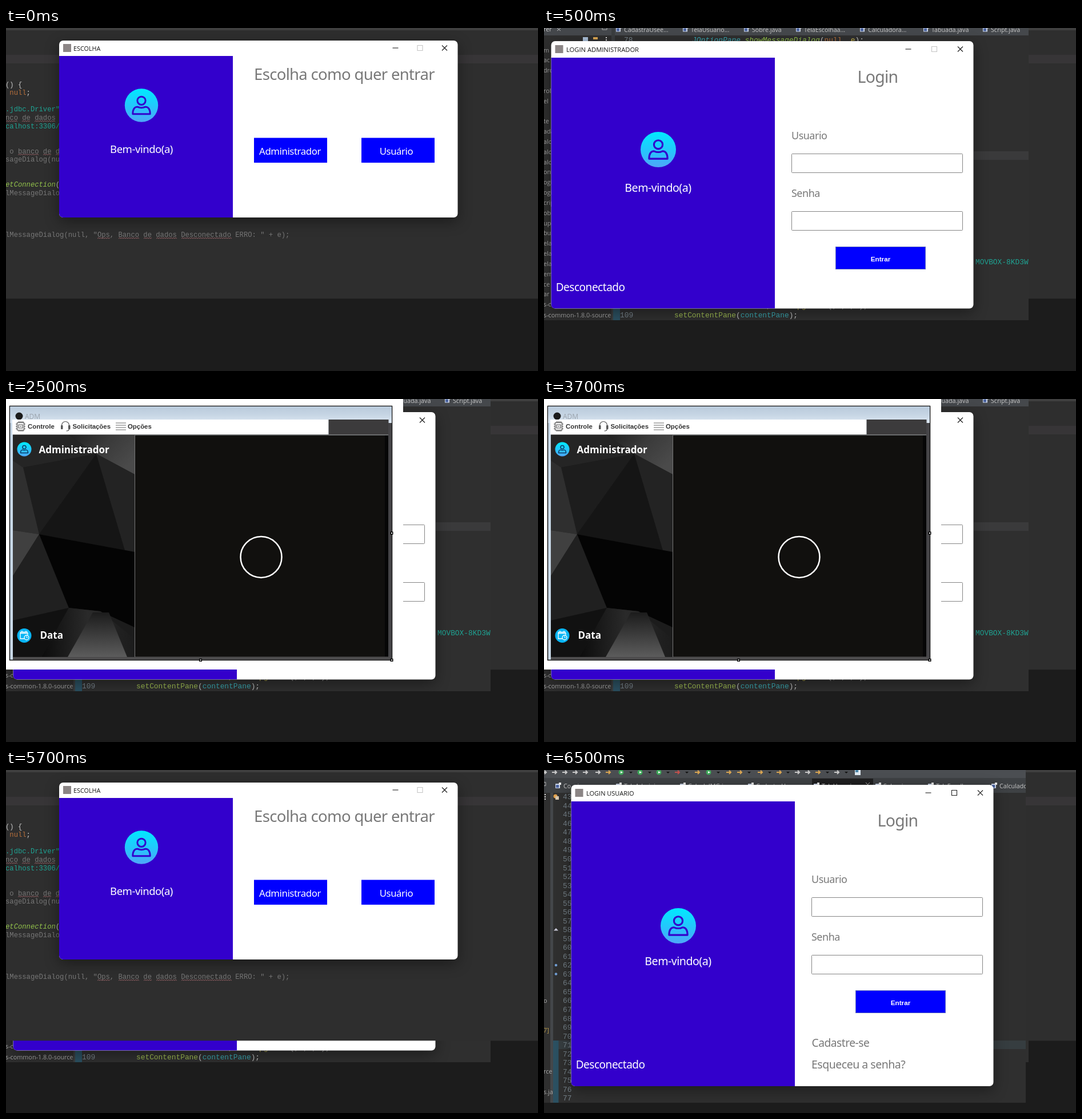
An HTML page that plays this animation: 931x601 px, repeating every 8 s.

```html
<!DOCTYPE html>
<html lang="pt">
<head>
<meta charset="utf-8">
<title>Login</title>
<style>
  html, body { margin: 0; width: 100%; height: 100%; overflow: hidden; background: #1c1c1c; }
  svg { display: block; width: 931px; height: 601px; }
  text { white-space: pre; }
  .form { font-family: "Noto Sans", "Open Sans", sans-serif; letter-spacing: -.025em; }
  .ui { font-family: "Open Sans", "Noto Sans", sans-serif; }
  .bold { font-family: "Liberation Sans", Arial, sans-serif; font-weight: bold; }
  .head { font-family: "Noto Sans", "Open Sans", sans-serif; font-weight: bold; }
  .code { font-family: "Liberation Mono", "Courier New", monospace; }
  .shadow { filter: drop-shadow(0 7px 12px rgba(0, 0, 0, .4)); }
</style>
</head>
<body>
<svg id="stage" viewBox="0 0 931 601" xmlns="http://www.w3.org/2000/svg"></svg>
<script>
const LOOP = 8000;
const INDIGO = '#3300cc', GRAY = '#787878', TEAL = '#1fa393', DIM = '#777', LIGHT = '#c4c4c4';

const rect = (x, y, w, h, fill, more = '') =>
  `<rect x="${x}" y="${y}" width="${w}" height="${h}" fill="${fill}" ${more}/>`;
const path = (d, stroke, width = 1, fill = 'none') =>
  `<path d="${d}" fill="${fill}" stroke="${stroke}" stroke-width="${width}"/>`;
const circle = (x, y, r, fill, more = '') => `<circle cx="${x}" cy="${y}" r="${r}" fill="${fill}" ${more}/>`;
const poly = (points, fill) => `<polygon points="${points}" fill="${fill}"/>`;
const text = (kind, x, y, size, fill, str, anchor = 'start') =>
  `<text class="${kind}" x="${x}" y="${y}" font-size="${size}" fill="${fill}" text-anchor="${anchor}">${str}</text>`;

// parts: [string, colour, italic?]
const code = (x, y, size, ...parts) => text('code', x, y, size, LIGHT, parts.map(([s, c, it]) =>
  `<tspan fill="${c}"${it ? ' font-style="italic"' : ''}>${s}</tspan>`).join(''));

const wave = (x, y, w) => {
  let d = `M${x} ${y}`;
  for (let i = 2; i <= w; i += 2) d += `L${x + i} ${y + (i % 4 ? -1.6 : 0)}`;
  return path(d, '#9a6468', .9);
};

const avatar = (x, y, r, ink = INDIGO, width = .1) =>
  circle(x, y, r, 'url(#sky)') +
  `<g transform="translate(${x} ${y}) scale(${r})" fill="none" stroke="${ink}" stroke-width="${width}">
    <circle cy="-.28" r=".245"/>
    <path d="M-.52 .52Q-.52 .1-.24 .09Q0 .2 .24 .09Q.52 .1 .52 .52Z" stroke-linejoin="round"/></g>`;

function frame(x, y, w, h, bar, split, title, size, resizable) {
  const right = x + w, mid = y + bar / 2 - .5;
  const cx = right - 23, gap = bar < 28 ? 43 : 45.5;
  const id = 'win' + Math.round(x);
  return rect(x, y, w, h, '#fff', 'rx="7" class="shadow"') +
    `<clipPath id="${id}">${rect(x, y, w, h, '#fff', 'rx="7"')}</clipPath>` +
    `<g clip-path="url(#${id})">${rect(x, y + bar, split - x, h - bar, INDIGO)}</g>` +
    rect(x + 7, mid - 7, 14, 14, '#8b8585') +
    text('ui', x + (bar < 28 ? 25 : 26.5), mid + 4.6, size, '#161616', title) +
    path(`M${cx - 2 * gap - 5} ${mid}h10`, '#222', 1.1) +
    path(`M${cx - gap - 4.5} ${mid - 4.5}h9v9h-9z`, resizable ? '#222' : '#c4c4c4', 1.1) +
    path(`M${cx - 4.5} ${mid - 4.5}l9 9m0-9l-9 9`, '#222', 1.2);
}

const field = (x, y) => rect(x + .5, y + .5, 299, 33, '#fff', 'stroke="#858585" rx="1"');

function loginForm(dx, dy) {
  return `<g transform="translate(${dx} ${dy})">` +
    text('form', 584, 96, 28.4, GRAY, 'Login', 'middle') +
    text('form', 433, 195, 17.9, GRAY, 'Usuario') + field(433, 220) +
    text('form', 433, 296, 17.9, GRAY, 'Senha') + field(433, 321) +
    rect(510.5, 383.5, 157, 39, '#0000ff', 'stroke="#5a66c0"') +
    text('bold', 589, 409, 11.7, '#fff', 'Entrar', 'middle') + '</g>';
}

const tab = (x, y, str) => rect(x - 14, y - 8, 8, 8, '#c9d3e6') + rect(x - 13, y - 6, 5, 5, '#4a63a0') +
  rect(x - 8, y - 10, 4, 4, '#e6e6e6') + text('ui', x, y, 10.7, '#c8c8c8', str);

function choice() {
  const row = (y, ...parts) => code(-1, y, 12.2, ...parts);
  const line = (y, str, color = DIM) => row(y, [str, color]);
  const button = (x, label) => rect(x, 192.5, 128, 43.5, '#0000ff') +
    text('form', x + (label.length > 8 ? 63 : 61), 221.5, 16.8, '#fff', label, 'middle');
  return rect(0, 0, 931, 474.5, '#2e2e2e') + rect(0, 0, 931, 4, '#404040') + rect(0, 47, 931, 15, '#373537') +
    row(103, ['() {', LIGHT]) +
    row(117, [' null', '#b8703c'], [';', LIGHT]) +
    line(146, '.jdbc.Driver"', TEAL) +
    line(161, 'nco de dados') + wave(0, 164, 20) + wave(28, 164, 14) + wave(50, 164, 37) +
    line(175.5, 'calhost:3306/', TEAL) +
    line(219.5, ' o banco de d') + wave(21, 222.5, 37) + wave(65, 222.5, 14) + wave(87, 222.5, 6) +
    line(234, 'sageDialog(nu') +
    row(278, ['etConnection', '#93c34b', 1], ['(', LIGHT]) +
    line(293, 'lMessageDialo') +
    line(366, 'lMessageDialog(null, "Ops, Banco de dados Desconectado ERRO: " + e);') +
    wave(160, 369, 22) + wave(197, 369, 36) + wave(241, 369, 14) + wave(263, 369, 36) + wave(307, 369, 88) +
    frame(93, 22, 697.5, 310, 27, 397, 'ESCOLHA', 10.8) +
    avatar(237, 135.5, 29.2) +
    text('form', 237, 218.5, 18.5, '#fff', 'Bem-vindo(a)', 'middle') +
    text('form', 592, 90.5, 27.5, GRAY, 'Escolha como quer entrar', 'middle') +
    button(434, 'Administrador') + button(622, 'Usuário');
}

function adminLogin() {
  const tree = 'm ac dro  rol el  te ada alc alc alc ont ogi ogi crip obr upo bur ela ela ela em ce ar s-c'.split(' ');
  const tabs = [[140, 'CadastraUsee...'], [257, 'TelaUsuario...'], [364, 'Sobre.java'], [455, 'TelaEscolhaa...'],
    [567, 'Calculadora...'], [678, 'Tabuada.java'], [782, 'Script.java']];
  return rect(0, 0, 848, 512, '#2f2f2f') + rect(0, 0, 848, 13, '#45484c') + rect(118, 0, 6, 512, '#3a3d3f') +
    rect(752, 216, 96, 15, '#3a3a3b') + rect(121, 488, 12, 24, '#2b5061') +
    text('ui', -1, 6, 10.7, '#c8c8c8', 'rer') + path('M23 0l6 5m0-5l-6 5', '#bbb') + path('M102 0v3h8v-3', '#aaa') +
    tabs.map(([x, s]) => tab(x, 6.5, s)).join('') +
    rect(68, 16, 9, 7, '#a9bfd8') + rect(86, 16, 8, 4, '#d9a552') + rect(108, 16, 2, 2, '#ddd') + rect(108, 20, 2, 2, '#ddd') +
    code(140, 25, 12.87, ['78', '#76828a']) +
    code(259, 25, 12.87, ['JOptionPane', '#39a7b0', 1], ['.', LIGHT], ['showMessageDialog', '#93c34b', 1],
      ['(', LIGHT], ['null', '#b8703c'], [', ', LIGHT], ['e', '#c9b54a'], [');', LIGHT]) +
    tree.map((s, i) => text('ui', -1, 42.5 + i * 17.83, 10.8, '#a8a8a8', s)).join('') +
    text('ui', -1, 506.5, 10.8, '#a8a8a8', 's-common-1.8.0-source') +
    code(133, 506.5, 12.87, ['109', '#76828a']) +
    code(389, 491, 12.87, [',      pg', '#a9a04a'], ['     (, , , );', '#999']) +
    code(228, 506.5, 12.87, ['setContentPane', '#9fbd52'], ['(', LIGHT], ['contentPane', '#39a7b0'], [');', LIGHT]) +
    code(755, 413.5, 12.87, ['MOVBOX-8KD3W', TEAL]) +
    frame(12.5, 23, 739, 468.5, 29, 404, 'LOGIN ADMINISTRADOR', 11.2) +
    avatar(200, 213, 31) +
    text('form', 199.5, 286.5, 19.6, '#fff', 'Bem-vindo(a)', 'middle') +
    text('form', 20.7, 461, 19, '#fff', 'Desconectado') +
    loginForm(0, 0);
}

function panel() {
  const facets = [
    ['12,63 110,63 158,96 30,120 12,108', '#252525'],
    ['110,63 225,63 225,132 158,96', 'url(#glint)'],
    ['30,120 158,96 58,237', '#1d1d1d'],
    ['12,108 30,120 58,237 12,230', '#2f2f2f'],
    ['12,230 58,237 12,310', '#404040'],
    ['12,310 58,237 110,366 12,388', '#202020'],
    ['158,96 208,265 58,237', '#151515'],
    ['158,96 225,132 225,268 208,265', '#232323'],
    ['58,237 225,268 225,400 165,372 110,366', '#040404'],
    ['12,388 110,366 62,452 12,452', '#111'],
    ['110,366 165,372 225,420 225,452 62,452', 'url(#fold)'],
    ['152,374 180,374 212,452 108,452', 'url(#glow)']];
  return facets.map(f => poly(...f)).join('');
}

function admin() {
  const handle = (x, y) => rect(x - 2.5, y - 2.5, 5, 5, '#000') + rect(x - 1, y - 1, 2, 2, '#fff');
  const menu = (x, s) => text('bold', x, 52, 11.4, '#333', s);
  return rect(0, 0, 695, 474, '#fff') +
    rect(6.5, 12.5, 669, 445, '#c9d9e8', 'stroke="#111" stroke-width="1.5"') +
    rect(7, 13, 668, 29, 'url(#bar)') +
    circle(23, 30, 6.5, '#1b1b1b') + text('ui', 33, 35, 12, '#9aa3ac', 'ADM') +
    rect(11, 36, 553.5, 26.5, '#fff') + rect(564.5, 36, 105, 27, '#3c3b3c') +
    rect(669, 42, 6, 415, '#454447') + rect(12, 451, 660, 6, '#4c4b4c') +
    rect(12, 62, 657, 1.5, '#777') +
    path('M19.5 41.5h12v13h-12zM17 44h3m-3 4h3m-3 4h3m11-8h3m-3 4h3m-3 4h3M22 45h7v6h-7zM24 48h3M21 40h10M21 56h10', '#555', 1.2) +
    path('M97.5 48v-2a6.5 6.5 0 0 1 13 0v2m0 4q0 4-5 4', '#555', 1.2) +
    rect(96, 46, 3.5, 7, '#555', 'rx="1"') + rect(109, 46, 3.5, 7, '#555', 'rx="1"') +
    [42, 46, 50, 54].map(y => path(`M192 ${y}h18`, '#8b8b8b', 1.3)).join('') +
    menu(38, 'Controle') + menu(116.5, 'Solicitações') + menu(213, 'Opções') +
    rect(12, 63, 213, 388.5, '#1c1c1c') + panel() +
    rect(225, 63, 1, 389, '#777') + rect(226, 63.5, 437, 388, '#11100e') + rect(663, 63.5, 6, 388, '#060606') +
    avatar(32, 88, 12.5, '#083c66', .12) + text('head', 57.5, 95, 17, '#fff', 'Administrador') +
    circle(32, 414.5, 12.5, '#08b5f4') +
    path('M25 410.5h13v3M25 408.5h13M25 409v11h7M28 406v3m7-3v3', '#fff', 1.3) +
    circle(36, 418, 4, '#08b5f4', 'stroke="#fff" stroke-width="1.3"') + path('M36 415.5v2.5h2', '#fff') +
    text('head', 59.5, 419.5, 17, '#fff', 'Data') +
    circle(446.5, 277, 36, 'none', 'stroke="#fff" stroke-width="2.5"') +
    handle(675, 235) + handle(340.5, 457.5) + handle(675, 457.5);
}

function userLogin() {
  const tabs = [[34, 'Co....java'], [140, 'TelaAdminio...'], [252, 'CalculaIMG.java'], [371, 'CadastraUsee...'],
    [486, 'TelaUsuario...'], [594, 'Sobre.java'], [686, 'TelaEscolhaa...'], [797, 'Calculadora...']];
  const tools = { '#c8c8c8': [0, 18, 36, 54, 72, 94, 443, 461, 512], '#d9a552': [112, 268, 323, 342, 378, 411, 479],
    '#3fa85a': [135, 168, 201, 288], '#c2504c': [233] };
  const arrows = [152, 185, 217, 250, 305, 359, 395, 427, 496, 529];
  const icon = (x, c) => c === '#3fa85a' ? circle(x, 4, 4.5, c) + poly(`${x - 1},2 ${x + 3},4 ${x - 1},6`, '#fff')
    : path(`M${x - 4} 4h8m-3-3l3 3-3 3`, c, 2);
  const note = (y, s, c = '#a8a8a8') => text('ui', -1, y, 10.8, c, s);
  let out = rect(0, 0, 843, 583, '#2f2f2f') + rect(0, 0, 843, 14, '#4b4e52') + rect(0, 14, 843, 26, '#3e4144') +
    rect(469, 15, 107, 25, '#1f1f20') + rect(11, 40, 5, 543, '#44474a') +
    rect(16, 474, 827, 15, '#363d40') + rect(16, 474, 9.5, 109, '#2b5061');
  for (const [c, xs] of Object.entries(tools)) out += xs.map(x => icon(x, c)).join('');
  out += arrows.map(x => poly(`${x - 3},3 ${x + 3},3 ${x},6`, '#111')).join('') +
    rect(544, 0, 10, 9, '#dce6ee') + rect(545, 0, 5, 4, '#4a86a8') +
    tabs.map(([x, s]) => tab(x, 32, s)).join('') + path('M563 22l7 7m0-7l-7 7', '#bbb');
  for (let n = 43; n <= 77; n++) out += code(33, 51.3 + (n - 43) * 15.53, 12.87, [n, '#76828a']);
  return out + path('M-2 21.5h5v6h-5', '#aaa') + [42, 46, 50].map(y => rect(1, y, 2, 2, '#ddd')).join('') +
    circle(20, 46, 3.5, '#e0a04c') + rect(20, 46, 6, 6, '#d8c8b0') +
    poly('17,281.5 25,281.5 21,277', '#c9c9d8') + circle(21, 342, 2.3, '#6f9bd0') + circle(21, 357.5, 2.3, '#6f9bd0') +
    note(408, 'o') + note(460, '7]', '#b89a4a') + note(532, 'rce') + note(568, 's.ja') +
    frame(47.5, 26, 739, 528, 29, 439, 'LOGIN USUARIO', 11, true) +
    avatar(235, 273, 31) +
    text('form', 234.5, 341.5, 19.6, '#fff', 'Bem-vindo(a)', 'middle') +
    text('form', 55.7, 522.5, 19, '#fff', 'Desconectado') +
    loginForm(35, 3) +
    text('form', 468.5, 485, 19.2, GRAY, 'Cadastre-se') +
    text('form', 468, 522.5, 19.5, GRAY, 'Esqueceu a senha?');
}

const grad = (id, dir, ...stops) => `<linearGradient id="${id}" ${dir}>` +
  stops.map((c, i) => `<stop offset="${i / (stops.length - 1)}" stop-color="${c}"/>`).join('') + '</linearGradient>';
const down = 'x1="0" y1="0" x2="0" y2="1"';

// each layer stays on top of the earlier ones until the loop ends
const steps = [
  { at: 0, w: 931, h: 474.5, draw: choice },
  { at: 500, w: 848, h: 512, draw: adminLogin },
  { at: 2500, w: 695, h: 474, draw: admin },
  { at: 4500, w: 931, h: 474.5, draw: choice },
  { at: 6500, w: 843, h: 583, draw: userLogin }
];

const stage = document.getElementById('stage');
stage.innerHTML = '<defs>' +
  grad('sky', down, '#00eaff', '#22c8fc', '#4fa6f8') +
  grad('bar', down, '#b9cadb', '#c6d5e4', '#dce7f2') +
  grad('glint', 'x1="0" y1="0" x2="1" y2=".6"', '#1f1f1f', '#3a3a3a', '#4a4a4a') +
  grad('fold', 'x1="0" y1="0" x2="1" y2="0"', '#0c0c0c', '#2a2a2a', '#1c1c1c') +
  grad('glow', down, '#1c1c1c', '#3c3c3c', '#5c5c5c') +
  steps.map((s, i) => `<clipPath id="cut${i}">${rect(0, 0, s.w, s.h, '#fff')}</clipPath>`).join('') +
  '</defs>' + rect(0, 0, 931, 601, '#1c1c1c') +
  steps.map((s, i) => `<g class="layer" clip-path="url(#cut${i})">${s.draw()}</g>`).join('');

const layers = stage.querySelectorAll('.layer');
const start = performance.now();
function tick() {
  const t = (performance.now() - start) % LOOP;
  steps.forEach((s, i) => { layers[i].style.visibility = t >= s.at ? 'visible' : 'hidden'; });
  requestAnimationFrame(tick);
}
tick();
</script>
</body>
</html>
```
